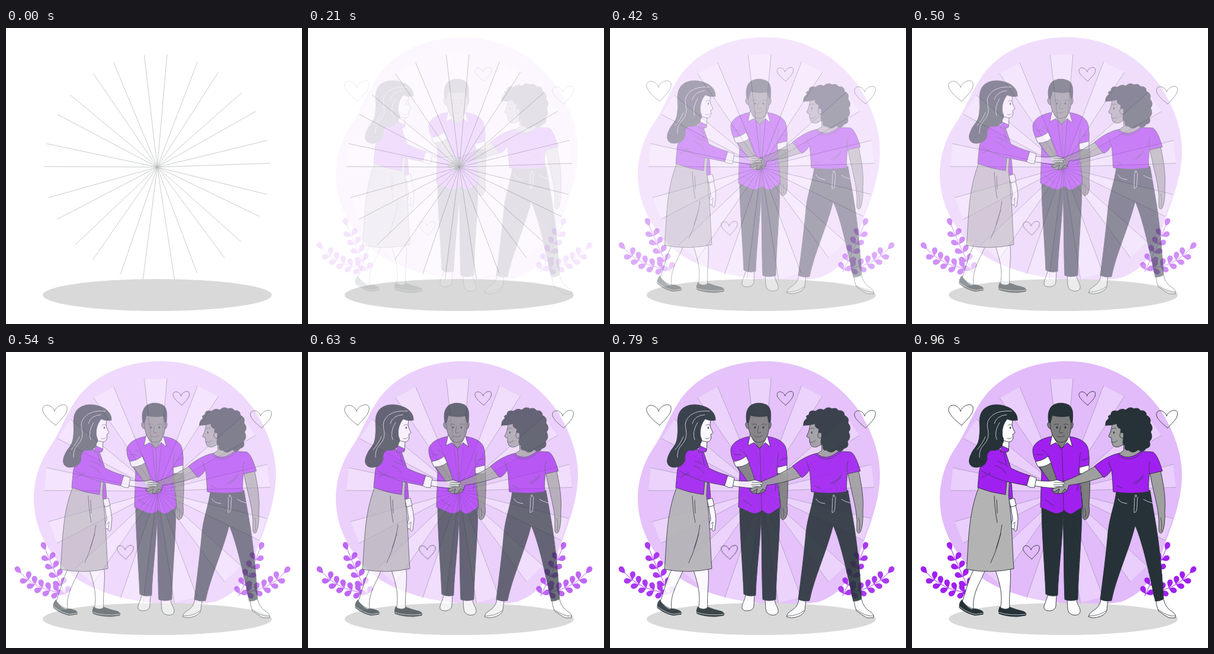
These frames come from a looping animation (500x500 px, 1000 ms). An HTML page:

```html
<!DOCTYPE html>
<html lang="en">
<head>
<meta charset="utf-8">
<title>Hands together</title>
<style>
  html, body { margin: 0; width: 100%; height: 100%; overflow: hidden; background: #fff; }
  svg { display: block; width: 100vw; height: 100vh; }
  path, ellipse { stroke-linecap: round; stroke-linejoin: round; }
  .line { fill: none; stroke: #263238; stroke-width: .9; }
  .thin { fill: none; stroke: #263238; stroke-width: .7; }
  .pale { fill: none; stroke: #fff; stroke-width: .7; }
  .white, .purple, .cloth, .brown, .tan, .dark { stroke: #263238; stroke-width: .9; }
  .white { fill: #fff; }
  .purple { fill: #a020f0; }
  .cloth { fill: #b3b3b3; }
  .brown { fill: #7d7d7d; }
  .tan { fill: #9f9f9f; }
  .dark { fill: #263238; }
  .dot { fill: #263238; }
  .leaf { fill: #a020f0; }
  .stem { fill: none; stroke: #a020f0; stroke-width: 1; }
  .heart { fill: none; stroke: #263238; stroke-width: .9; vector-effect: non-scaling-stroke; }
  .beam { fill: #fff; fill-opacity: .27; }
  .ray { fill: none; stroke: #263238; stroke-width: .7; }
</style>
</head>
<body>
<svg viewBox="0 0 500 500">
  <defs>
    <path id="heart" class="heart" d="M-2-24C-5-34-17-37-21-31C-26-23-15-12 0 0C8-10 21-19 19-31C16-39 1-34-2-24Z"/>
  </defs>

  <g class="fade">
    <path fill="#e2bbfa" d="M262 15.500C330 15.500 387 50 421 100C445 138 456 175 456 207C456 250 440 290 427 325C412 370 398 406 353 422C325 427 290 427 265 425C215 422 164 410 124 386C75 352 47 300 47 248C47 215 58 185 72 164C92 135 100 107 119 80C148 40 200 15.500 262 15.500Z"/>
  </g>
  <ellipse cx="255.5" cy="451" rx="193.5" ry="27" fill="#d9d9d9"/>
  <g id="beams"></g>
  <g id="rays" opacity=".36"></g>

  <g class="fade" id="plants"></g>
  <g class="fade">
    <use href="#heart" transform="translate(84 124)"/>
    <use href="#heart" transform="translate(297 90) scale(.67)"/>
    <use href="#heart" transform="translate(432 128.500) scale(.86)"/>
    <use href="#heart" transform="translate(202.500 350) scale(.67)"/>
  </g>

  <!-- man -->
  <g class="fade">
    <path class="white" d="M229 411C228 419 222 427 223 433Q225 438 234 437Q242 436 243 429L244 411Z"/>
    <path class="white" d="M262 418C263 427 262 435 265 440Q271 446 279 444Q285 442 284 436C283 430 278 425 278 418Z"/>
    <path class="brown" d="M284 204L300 203C301 225 300 245 299 259Q301 272 297 280Q292 286 289 281L288 258Z"/>
    <path class="thin" d="M292 264Q295 271 293 279"/>
    <path class="dark" d="M219 260C219 305 224 360 226 409Q235 414 246 411C247 370 254 325 255 275C257 330 256 370 258 418Q268 422 280 418C281 365 287 315 287 260Z"/>
    <path class="purple" d="M234 143C220 146 206 152 204 165C204 175 207 181 210 187L219 202L217 262Q231 269 242 273Q252 273 257 267Q264 275 271 273L288 262C285 235 282 215 283 196L299 192Q300 179 298 166C296 152 284 146 268 143Z"/>
    <path class="thin" d="M253 161Q256 215 256 268M283 196Q282 180 285 170M232 179Q229 170 219 165M287 183L297 180M210 173L221 174M281 220L279 234M224 249L240 260"/>
    <path class="brown" d="M215 193L234 186C238 197 242 207 245 218L259 223L262 235L254 239L242 239L236 234L239 226L232 218Z"/>
    <path class="white" d="M209 185Q222 183 230 176L235 187Q224 195 213 194Z"/>
    <path class="white" d="M283 195L299 191L299 205Q290 207 283 205Z"/>
    <path class="brown" d="M241 144L242 151L252 163L263 152L262 143Z"/>
    <path class="white" d="M237 139L233 158L243 153L252 162L242 149Z"/>
    <path class="white" d="M265 139L271 160L262 153L254 162L262 149Z"/>
    <path class="brown" d="M234 120Q228 117 229 124Q231 131 236 130ZM268 120Q273 117 272 124Q271 131 267 130Z"/>
    <path class="brown" d="M234 105C232 126 235 139 242 148Q251 157 261 149C269 140 270 125 268 105Q250 100 234 105Z"/>
    <path class="dark" d="M231 119C228 104 232 91 242 88Q252 84 264 89C273 94 272 106 271 119L268 118L266 108Q250 111 237 107L234 119Z"/>
    <path class="thin" d="M240 123Q244 120 248 123M256 123Q260 120 264 123M251 125L249 136Q252 138 255 136M245 142Q251 146 258 141"/>
    <ellipse class="dot" cx="245" cy="127.500" rx="1.500" ry="2.100"/>
    <ellipse class="dot" cx="259" cy="127.500" rx="1.500" ry="2.100"/>
  </g>

  <!-- woman on the right -->
  <g class="fade">
    <path class="white" d="M319 418C318 427 313 433 306 437Q299 441 298 447Q305 451 317 447Q326 444 329 437L331 419Z"/>
    <path class="white" d="M412 419Q413 429 416 437Q425 444 434 449L445 449Q447 444 440 439Q428 432 425 418Z"/>
    <path class="thin" d="M299 446Q316 446 328 437M416 435Q431 447 445 446"/>
    <path class="tan" d="M402 205L420 201C425 225 429 248 427 270Q428 292 423 304Q419 309 417 302L417 284C416 260 407 235 402 205Z"/>
    <path class="thin" d="M420 280Q423 288 421 303"/>
    <path class="dark" d="M345 237C342 260 334 278 331 305C328 340 323 380 318 418Q327 422 337 420C345 380 365 340 377 293C389 320 400 370 411 421Q419 421 425 417C422 370 418 325 410 280L402 234Z"/>
    <path class="pale" d="M376 246L375 271Q380 272 380 261L381 245M348 248Q351 255 363 256M391 249Q397 253 406 255"/>
    <circle class="pale" cx="378" cy="243" r="1.500"/>
    <path class="tan" d="M309 193C293 203 277 211 260 217L245 225L236 234L241 236L249 231L247 239L252 239L258 231L262 234L265 225C287 222 306 217 322 211Z"/>
    <path class="purple" d="M350 171C335 174 321 182 308 193L324 212Q332 208 337 199C339 212 339 226 340 236Q370 241 400 236C399 225 400 215 401 206L423 201C419 188 414 173 407 169Q398 168 386 168Z"/>
    <path class="thin" d="M337 199L332 185M401 206Q399 193 402 185M373 222Q386 216 391 207M377 224L391 211M346 226L355 230"/>
    <path class="tan" d="M357 153L358 166L350 172Q365 185 386 168L386 148Z"/>
    <path class="thin" d="M348 174Q367 190 389 169"/>
    <path class="tan" d="M340 118C336 126 338 132 332 142Q333 145 337 145L337 151L339 157Q342 162 350 160Q362 155 366 143L360 115Z"/>
    <path class="dark" d="M327 124Q326 116 333 112Q329 108 336 106Q336 97 347 100Q354 94 361 98Q368 91 375 96Q382 93 386 99Q396 98 396 107Q405 111 402 120Q409 128 403 135Q408 145 401 151Q405 161 395 163Q391 171 382 165Q373 173 366 166Q358 167 360 158Q354 156 357 147Q350 139 353 130Q344 127 347 121Q337 124 327 124Z"/>
    <path class="tan" d="M357 137Q352 134 351 140Q351 147 357 145Z"/>
    <path class="thin" d="M338 130Q341 127 345 129M338 152Q344 154 347 149"/>
    <ellipse class="dot" cx="341" cy="136" rx="1.100" ry="2"/>
  </g>

  <!-- woman on the left -->
  <g class="fade">
    <path class="white" d="M104 368C95 385 92 402 85 421Q94 432 104 434C101 409 114 392 123 370Z"/>
    <path class="white" d="M141 369C149 392 154 412 149 435L165 434C163 412 168 390 166 367Z"/>
    <path class="dark" d="M84 419Q79 424 80 432Q92 442 107 445L120 443Q122 438 115 436Q106 432 101 435Q91 431 84 419Z"/>
    <path class="dark" d="M148 431Q145 437 147 442Q160 447 178 447L192 445Q195 441 188 438Q175 435 165 431Q160 438 148 431Z"/>
    <path class="pale" d="M80 430Q94 441 108 443L120 441M147 440Q166 446 192 443"/>
    <path class="white" d="M167 260L175 259Q178 269 179 282L177 301Q174 305 172 299L168 298Q166 293 170 283Z"/>
    <path class="thin" d="M170 291L174 287L173 299"/>
    <path class="purple" d="M160 217L168 222L170 246L164 249Z"/>
    <path class="white" d="M164 249L173 247L176 259L167 262Z"/>
    <path class="cloth" d="M157 168L166 196L163 242C169 282 169 325 172 366Q132 375 92 367C96 325 94 275 113 228Z"/>
    <path class="line" d="M139 243Q140 268 144 288M143 250L144 272M152 292Q148 324 133 356M150 307L142 332"/>
    <path class="white" d="M154 144L152 160L163 168L164 150Z"/>
    <path class="purple" d="M132 166C121 178 114 191 113 207L111 229Q134 238 158 241L160 219L195 226L200 209Q180 203 167 196L158 169Q146 161 132 166Z"/>
    <path class="thin" d="M118 201Q140 214 160 219M118 212L133 204M141 192Q151 194 159 205M144 184L157 190M155 171L160 193"/>
    <path class="purple" d="M151 158L164 164L161 169L150 169Z"/>
    <path class="white" d="M207 216Q220 219 235 218L245 216L257 220Q260 223 254 224L257 227L247 228L240 230Q225 229 206 226Z"/>
    <path class="thin" d="M240 220L256 221M239 224L254 224M240 227L250 227"/>
    <path class="white" d="M199 209Q205 210 210 213L207 229Q200 230 194 226Z"/>
    <path class="white" d="M153 111L170 115Q168 123 170 128L174 136Q173 139 170 139L171 144Q170 151 164 152Q156 151 150 147Z"/>
    <path class="dark" d="M178 115C179 104 169 95 159 92C143 86 125 89 118 101C111 113 116 126 114 140C113 158 106 160 101 170Q94 183 98 190Q103 197 114 194Q124 193 127 181Q125 170 133 166Q151 168 153 154Q157 150 153 143C151 132 154 121 161 113Q168 117 178 115Z"/>
    <path class="pale" d="M168 100Q149 98 137 106Q124 116 128 130Q132 146 121 157Q113 165 114 178M160 106Q143 107 139 121M148 119Q138 135 143 148M124 143Q119 155 110 165"/>
    <path class="thin" d="M162 124Q166 121 169 124M161 146Q166 148 169 144"/>
    <ellipse class="dot" cx="166" cy="128" rx="1.100" ry="2"/>
  </g>
</svg>
<script>
const $ = id => document.getElementById(id);
const path = (cls, d, extra = "") => `<path class="${cls}" d="${d}" ${extra}/>`;

// Light beams: outer corners in pairs around one hub
const hub = [255.5, 235];
const beams = [
  [233.5, 46, 272, 45], [323.5, 57, 358.5, 75], [398.5, 109, 421.5, 141],
  [441, 190, 446, 228.5], [440, 281, 427.5, 318], [397, 361, 369, 388],
  [322.5, 413.5, 284.5, 424], [231.5, 424, 193.5, 416], [147, 391, 117, 366],
  [86.5, 323, 72, 286.5], [65, 234, 69, 195.5], [87, 146, 109, 113.5],
  [148, 77.5, 182, 59]
];
const wedges = cls => beams.map(([a, b, c, d]) => path(cls, `M${a} ${b}L${hub}L${c} ${d}`)).join("");
$("beams").innerHTML = wedges("beam");
$("rays").innerHTML = wedges("ray");

// A sprig is a quadratic stem with leaf pairs and one leaf at the tip
const leafShape = "M0 0C3-1 5-5 10-4.700C14-4 15-1 14.500 0C15 2 13 4.700 9 4.500C5 4 3 1 0 0Z";
const quad = (a, b, c, t) => (1 - t) ** 2 * a + 2 * t * (1 - t) * b + t * t * c;
const slope = (a, b, c, t) => 2 * (1 - t) * (b - a) + 2 * t * (c - b);

function sprig([x0, x1, x2], [y0, y1, y2], pairs) {
  const leaf = (t, turn) => {
    const x = quad(x0, x1, x2, t), y = quad(y0, y1, y2, t);
    const angle = Math.atan2(slope(y0, y1, y2, t), slope(x0, x1, x2, t)) * 180 / Math.PI;
    return path("leaf", leafShape, `transform="translate(${x} ${y}) rotate(${angle + turn})"`);
  };
  let out = path("stem", `M${x0} ${y0}Q${x1} ${y1} ${x2} ${y2}`);
  for (let i = 0; i < pairs; i++) {
    const t = .04 + i * .185;
    out += leaf(t, 54) + leaf(t, -46);
  }
  return out + leaf(1, 0);
}
const plant = sprig([92, 52, 26], [406, 402, 374], 5) + sprig([102, 82, 67], [412, 372, 335], 5);
$("plants").innerHTML = plant + `<g transform="matrix(-1 0 0 1 495 0)">${plant}</g>`;

// 24 steps per second, with step times rounded to 10 ms
const LOOP = 1000, STEPS = 24;
const startOf = k => Math.round(k * LOOP / STEPS / 10) * 10;
const fades = document.querySelectorAll(".fade");

function draw(now) {
  const t = now % LOOP;
  let k = STEPS - 1;
  while (k > 0 && startOf(k) > t) k--;
  const u = k / STEPS;
  const alpha = k < 3 ? 0 : k === STEPS - 1 ? 1 : u * u * (3 - 2 * u);
  fades.forEach(g => g.setAttribute("opacity", alpha));
}

function tick() {
  draw(performance.now());
  requestAnimationFrame(tick);
}
tick();
</script>
</body>
</html>
```
